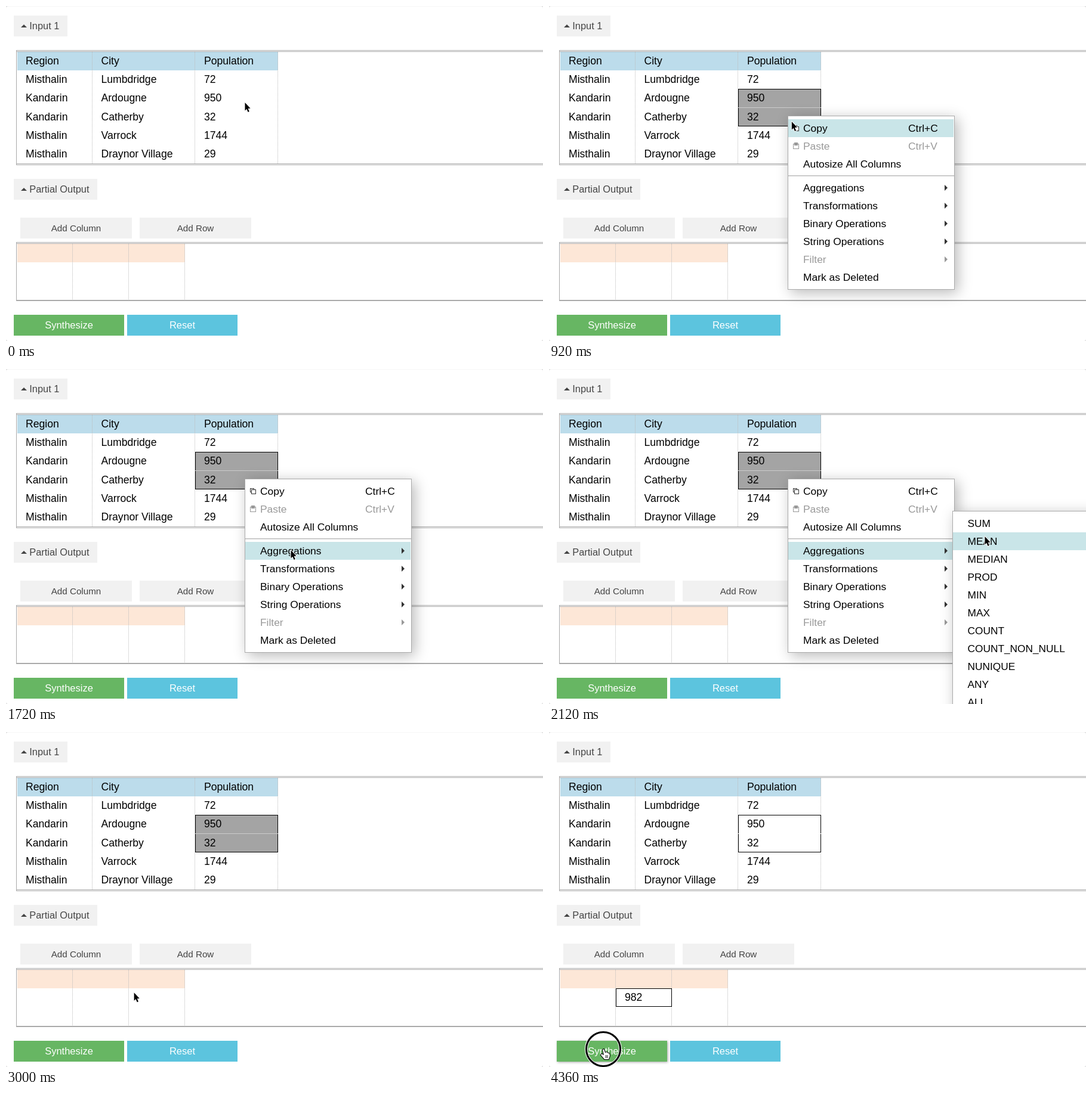
Write an HTML page with a canvas that moves like this. It is 900 px wide and 562 px high and loops after 4400 ms.

```html
<!DOCTYPE html>
<html>
<head>
<meta charset="utf-8">
<style>
html, body { margin: 0; width: 900px; height: 562px; overflow: hidden; background: #fff; }
canvas { display: block; }
</style>
</head>
<body>
<canvas id="stage" width="900" height="562"></canvas>
<script>
const ctx = document.getElementById('stage').getContext('2d');
const LOOP = 4400, STEP = 40;

const rows = [
  ['Region', 'City', 'Population'],
  ['Misthalin', 'Lumbdridge', '72'],
  ['Kandarin', 'Ardougne', '950'],
  ['Kandarin', 'Catherby', '32'],
  ['Misthalin', 'Varrock', '1744'],
  ['Misthalin', 'Draynor Village', '29']
];
const menuItems = ['Copy', 'Paste', 'Autosize All Columns', 'Aggregations', 'Transformations',
  'Binary Operations', 'String Operations', 'Filter', 'Mark as Deleted'];
const functions = ['SUM', 'MEAN', 'MEDIAN', 'PROD', 'MIN', 'MAX', 'COUNT',
  'COUNT_NON_NULL', 'NUNIQUE', 'ANY', 'ALL'];

// Cursor moves: start, end, target x, target y
const moves = [
  [120, 400, 400, 184], [800, 1480, 477, 304], [1720, 2120, 730, 281],
  [2160, 2320, 728, 253], [2520, 3080, 184, 448], [3840, 4240, 91, 532]
];
// Spans with the mouse button held
const presses = [[120, 400], [680, 760], [2360, 2440], [3240, 3360], [4280, LOOP]];

function box(x, y, w, h, color) {
  ctx.fillStyle = color;
  ctx.fillRect(x, y, w, h);
}

function text(str, x, y, size = 17.4, color = '#000', align = 'left') {
  ctx.font = `${size}px "Liberation Sans", Arial, sans-serif`;
  ctx.textAlign = align;
  ctx.fillStyle = color;
  ctx.fillText(str, x, y);
}

function poly(points, fill, stroke, width = 1) {
  ctx.beginPath();
  points.forEach(([x, y]) => ctx.lineTo(x, y));
  ctx.closePath();
  if (stroke) {
    ctx.strokeStyle = stroke;
    ctx.lineWidth = width;
    ctx.stroke();
  }
  ctx.fillStyle = fill;
  ctx.fill();
}

function outline(x, y, w, h, color) {
  ctx.strokeStyle = color;
  ctx.lineWidth = 1;
  ctx.strokeRect(x + .5, y + .5, w - 1, h - 1);
}

function shadowed(draw, blur, offset, alpha) {
  ctx.save();
  ctx.shadowColor = `rgba(0,0,0,${alpha})`;
  ctx.shadowBlur = blur;
  ctx.shadowOffsetX = ctx.shadowOffsetY = offset;
  draw();
  ctx.restore();
}

function button(label, x, y, w, size, fill, color) {
  box(x, y, w, 35, fill);
  text(label, x + w / 2, y + 23, size, color, 'center');
}

function toggle(label, y, w) {
  box(13, y, w, 35, '#f1f1f1');
  poly([[25, y + 20], [30, y + 15], [35, y + 20]], '#444');
  text(label, 39.3, y + 23, 16.4, '#444');
}

function frame(lines) {
  const top = lines[0], bottom = lines[lines.length - 1];
  box(17, top, 1, bottom - top, '#aaa');
  lines.forEach(y => box(17, y, 883, 1, '#aaa'));
}

function columnLines(xs, top, bottom) {
  ctx.save();
  ctx.setLineDash([1, 1]);
  ctx.strokeStyle = '#bbb';
  ctx.lineWidth = 1;
  for (const x of xs) {
    ctx.beginPath();
    ctx.moveTo(x + .5, top);
    ctx.lineTo(x + .5, bottom);
    ctx.stroke();
  }
  ctx.restore();
}

function page(t, pointer) {
  box(0, 0, 900, 562, '#ddd');
  ctx.beginPath();
  ctx.roundRect(0, .3, 900, 561.7, 4);
  ctx.fillStyle = '#fff';
  ctx.fill();

  toggle('Input 1', 16, 90);
  frame([74, 76, 264, 266]);
  box(19, 77, 437, 31, '#bcdceb');
  columnLines([144, 316, 455], 77, 264);
  inputSelection(t, pointer);
  rows.forEach((row, i) => row.forEach((cell, j) =>
    text(cell, [33, 159.5, 332][j], Math.round(98 + 31.2 * i), 17.6)));

  toggle('Partial Output', 290, 140);
  button('Add Column', 24, 355, 187, 15.2, '#f1f1f1', '#444');
  button('Add Row', 224, 355, 187, 15.2, '#f1f1f1', '#444');
  frame([396, 398, 493, 494]);
  box(19, 399, 281, 31, '#fde7d7');
  columnLines([111, 205, 299], 399, 492);
  if (t >= 3280) {
    box(112, 430, 94, 31, t < 3840 ? '#a4a4a4' : '#fff');
    outline(112, 430, 94, 31, '#000');
  }
  if (t >= 3840) text('982', 127, 451, 17.6);

  const synthesize = () => box(13, 518, 185, 35, '#67b663');
  if (pointer.y > 518) shadowed(synthesize, 4, 1, .35);
  button('Synthesize', 13, 518, 185, 16.5, '#67b663', '#fff');
  button('Reset', 203, 518, 185, 16.5, '#5cc4de', '#fff');
}

function inputSelection(t, pointer) {
  if (t < 120) return;
  const active = t < 3280, both = t > 400 || pointer.y > 171;
  const height = both ? 63 : 32;
  box(317, 139, 139, height, active ? '#a4a4a4' : '#fff');
  outline(317, 139, 139, height, '#000');
  if (both) box(317, 170, 139, 1, active ? '#ccc' : '#fff');
}

function panel(x, y, w, h) {
  shadowed(() => box(x, y, w, h, '#fff'), 22, 5, .28);
  outline(x, y, w, h, '#aaa');
}

function menu(pointer, open) {
  panel(400, 184, 280, 292);
  // The separator below the third item keeps that item lit
  const active = open || pointer.y >= 290 ? Math.max(3, Math.floor((pointer.y - 200) / 30))
    : Math.min(2, Math.floor((pointer.y - 190) / 30));
  menuItems.forEach((label, i) => {
    const y = 190 + 30 * i + (i > 2 ? 10 : 0);
    const color = i === 1 || i === 7 ? '#999' : '#000';
    if (i === active) box(401, y, 277, 30, '#c9e5e8');
    text(label, 426, y + 21, 17.4, color);
    if (i < 2) text(i ? 'Ctrl+V' : 'Ctrl+C', 602, y + 21, 17.4, color);
    if (i > 2 && i < 8) {
      poly([[663, y + 10], [668, y + 15], [663, y + 20]], i === 7 ? '#999' : '#333');
    }
  });
  box(401, 284, 278, 1.5, '#bbb');
  outline(409, 200, 7, 7, '#333');
  box(411, 202, 8, 8, '#fff');
  outline(411, 202, 8, 8, '#333');
  outline(409, 231, 10, 9, '#999');
  box(411, 229, 6, 5, '#999');
}

function submenu(pointer) {
  panel(676, 238, 280, 360);
  functions.forEach((name, i) => {
    const y = 244 + 30 * i;
    if (pointer.x > 677 && pointer.y >= y && pointer.y < y + 30) box(677, y, 223, 30, '#c9e5e8');
    text(name, 701.5, y + 21, 17.3);
  });
}

function ring({ x, y }) {
  ctx.beginPath();
  ctx.arc(x, y, 28.5, 0, 7);
  for (const [color, width] of [['#fff', 5], ['#000', 3]]) {
    ctx.strokeStyle = color;
    ctx.lineWidth = width;
    ctx.stroke();
  }
}

function cursor({ x, y }) {
  ctx.save();
  ctx.translate(x, y);
  ctx.lineJoin = 'round';
  if (y > 518) {
    poly([[-1, 1], [1, 0], [3, 6], [6, 5], [8, 7], [10, 7], [11, 11], [9, 17],
      [2, 17], [-4, 10], [-3, 8], [1, 10]], '#fff', '#000', 2);
    [4, 6.5].forEach(line => box(line, 10, 1, 5, '#000'));
  } else {
    poly([[0.5, 0], [.5, 13.5], [3.4, 10.8], [5.6, 16], [7.8, 15], [5.6, 10], [9.6, 9.7]],
      '#000', '#fff', 2);
  }
  ctx.restore();
}

function pointerAt(t) {
  let x = 400, y = 162;
  for (const [start, end, tx, ty] of moves) {
    const k = Math.min(1, Math.max(0, (t - start) / (end - start)));
    const ease = k * k * (3 - 2 * k);
    x += (tx - x) * ease;
    y += (ty - y) * ease;
  }
  return { x, y };
}

function render(now) {
  const t = Math.floor(now % LOOP / STEP) * STEP;
  const pointer = pointerAt(t);
  const open = t >= 1760;
  page(t, pointer);
  if (t >= 720 && t < 2440) {
    menu(pointer, open);
    if (open) submenu(pointer);
  }
  if (presses.some(([from, to]) => t >= from && t < to)) ring(pointer);
  cursor(pointer);
  requestAnimationFrame(render);
}

requestAnimationFrame(render);
</script>
</body>
</html>
```
